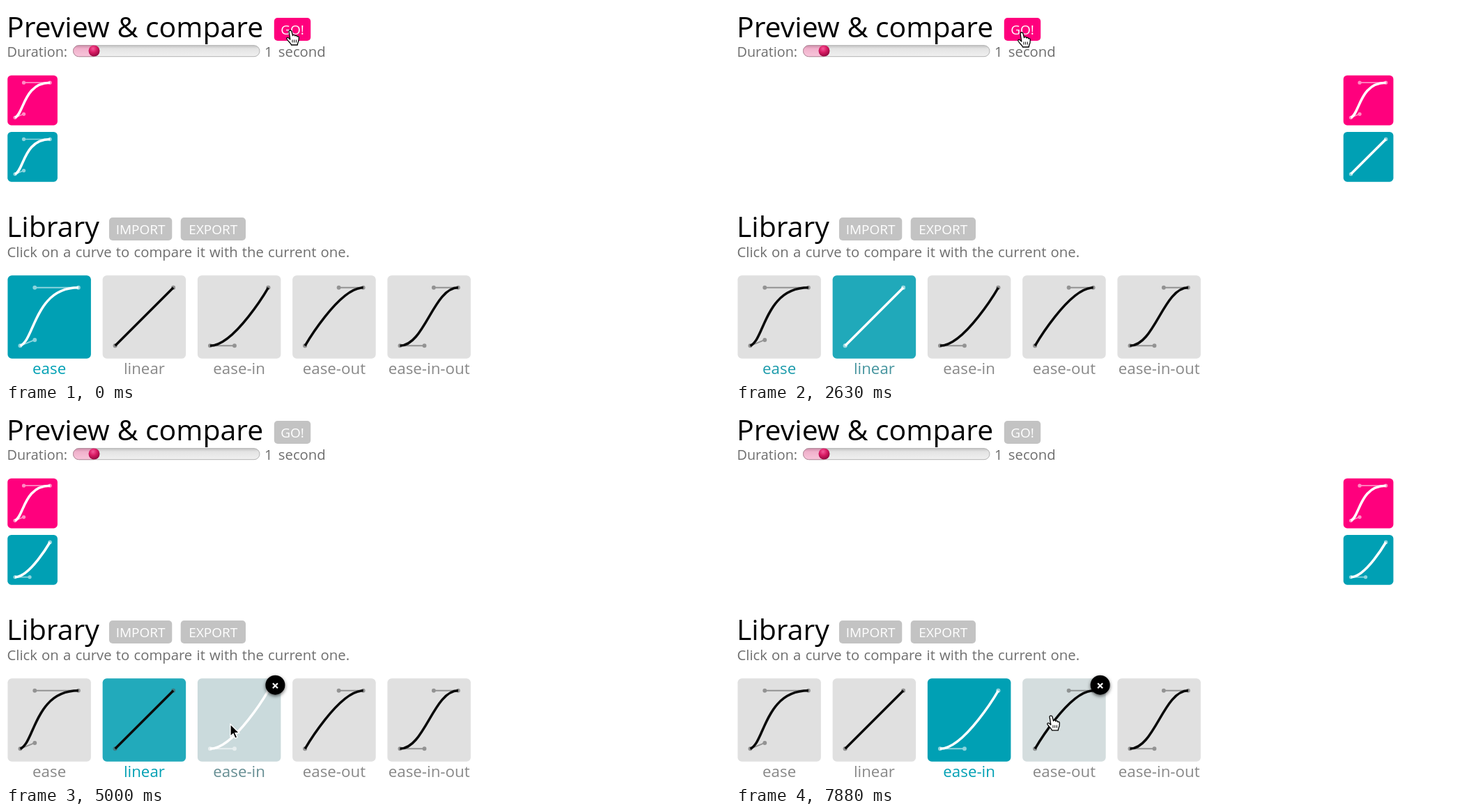
Recreate the animation shown at these times as an HTML page. Size 1039x539 px, loop 8000 ms.

```html
<!DOCTYPE html>
<html lang="en">
<head>
<meta charset="utf-8">
<title>Easing preview</title>
<style>
  html, body { margin: 0; width: 100%; height: 100%; overflow: hidden; background: #fff; }
  svg { display: block; width: 1039px; height: 539px; font-family: 'Open Sans', 'Noto Sans', sans-serif; }
  .heading { font-size: 41px; }
  .note { font-size: 20.3px; word-spacing: 1px; fill: #6e6e6e; }
  .label { font-size: 22.3px; text-anchor: middle; }
  .button { font-size: 19px; font-weight: 500; text-anchor: middle; fill: #fff; }
</style>
</head>
<body>
<svg id="stage" viewBox="0 0 1039 539">
  <defs>
    <linearGradient id="track" x2="0" y2="1">
      <stop offset="0" stop-color="#c4c4c4"/><stop offset=".3" stop-color="#e4e4e4"/><stop offset="1" stop-color="#f0f0f0"/>
    </linearGradient>
    <linearGradient id="filled" x2="0" y2="1">
      <stop offset="0" stop-color="#cf8fab"/><stop offset=".3" stop-color="#f0b2cc"/><stop offset="1" stop-color="#f8c4da"/>
    </linearGradient>
    <radialGradient id="knob" cx=".4" cy=".3" r=".75">
      <stop offset="0" stop-color="#f45a9b"/><stop offset=".45" stop-color="#d91c64"/><stop offset="1" stop-color="#8c063c"/>
    </radialGradient>
    <filter id="shadow" x="-50%" y="-50%" width="200%" height="200%">
      <feDropShadow dx="0" dy="2" stdDeviation="2.5" flood-opacity=".6"/>
    </filter>
  </defs>
  <text class="heading" x="1" y="44.500">Preview &amp; compare</text>
  <text class="note" x="1.500" y="73" style="font-size:19.8px">Duration:</text>
  <rect x="96.500" y="56.700" width="267.500" height="16" rx="8" fill="url(#track)" stroke="#b2b2b2"/>
  <path d="M126 56.700H104.500a8 8 0 0 0 0 16H126Z" fill="url(#filled)" stroke="#b5899b"/>
  <circle cx="126.500" cy="64.500" r="8" fill="url(#knob)"/>
  <text class="note" x="371" y="73" style="word-spacing:3px">1 second</text>
  <text class="heading" x="1" y="332">Library</text>
  <text class="note" x="1.500" y="361">Click on a curve to compare it with the current one.</text>
</svg>
<script>
const LOOP = 8000, STEP = 125;
const PINK = [255, 0, 125], TEAL = [0, 160, 180], GREY = [224, 224, 224];
const BUTTON_GREY = [195, 195, 195], LABEL_GREY = [136, 136, 136];
const LEFT = 2.2, TRAVEL = 869.5;
const rgb = color => `rgb(${color})`;

const CURVES = {
  'ease': [.25, .1, .25, 1],
  'linear': [0, 0, 1, 1],
  'ease-in': [.42, 0, 1, 1],
  'ease-out': [0, 0, .58, 1],
  'ease-in-out': [.42, 0, .58, 1]
};
const names = Object.keys(CURVES);

// Tracks are [time, value, ...] keys.
const goTrack = [[600, 1], [800, 0], [2300, 0], [2500, 1], [4100, 1], [4350, 0],
  [5500, 0], [5750, 1], [7100, 1], [7300, 0]];
const fillTracks = {
  'ease': [[1750, 1], [2250, 0]],
  'linear': [[1550, 0], [1700, .1], [2800, 1], [4940, 1], [5340, 0]],
  'ease-in': [[4940, 0], [5540, 1]],
  'ease-out': [[7650, 0], [7880, .055]]
};
const labelTracks = {
  'ease': [[2500, 1], [3100, 0]],
  'linear': [[2400, 0], [2630, .5], [3200, 1], [5750, 1], [6400, 0]],
  'ease-in': [[4850, 0], [5000, .25], [5880, .4], [6500, 1]]
};
const pointerTrack = [[0, 408, 35], [600, 405, 36], [880, 378, 36], [1400, 240, 400], [1500, 236, 417],
  [1850, 232, 425], [2400, 408, 44], [2630, 410, 38], [2950, 411, 37], [3250, 415, 3],
  [3500, 411, 37], [4000, 411, 38], [4380, 442, 36], [4875, 335, 430], [5000, 322, 453],
  [5150, 330, 440], [5320, 485, 250], [5630, 428, 40], [5880, 424, 34], [7050, 420, 34],
  [7250, 441, 62], [7750, 458, 425], [7880, 452, 441]];
const runs = [{ start: 22, right: true }, { start: 2942, right: false }, { start: 6110, right: true }];

const stage = document.getElementById('stage');

function add(parent, tag, attributes = {}, text = '') {
  const node = document.createElementNS(stage.namespaceURI, tag);
  set(node, attributes);
  node.textContent = text;
  return parent.appendChild(node);
}

function set(node, attributes) {
  for (const key in attributes) node.setAttribute(key, attributes[key]);
}

const mix = (a, b, k) => a + (b - a) * k;
const blend = (a, b, k) => rgb(a.map((v, i) => Math.round(mix(v, b[i], k))));

function sample(track, time, smooth = false) {
  const next = track.findIndex(key => key[0] > time);
  if (next === 0) return track[0].slice(1);
  if (next < 0) return track[track.length - 1].slice(1);
  const [from, to] = [track[next - 1], track[next]];
  let k = (time - from[0]) / (to[0] - from[0]);
  if (smooth) k = k * k * (3 - 2 * k);
  return from.slice(1).map((v, i) => mix(v, to[i + 1], k));
}

function bezier([x1, y1, x2, y2], x) {
  if (x <= 0 || x >= 1) return x <= 0 ? 0 : 1;
  const at = (a, b, s) => 3 * a * s * (1 - s) ** 2 + 3 * b * s * s * (1 - s) + s ** 3;
  let low = 0, high = 1;
  for (let i = 0; i < 24; i++) {
    const middle = (low + high) / 2;
    if (at(x1, x2, middle) < x) low = middle; else high = middle;
  }
  return at(y1, y2, low);
}

function makeTile(scale) {
  const small = scale < 1;
  const group = add(stage, 'g');
  const box = add(group, 'rect', { width: 119.5, height: 119.5, rx: small ? 9 : 6 });
  const handles = add(group, 'g', { 'stroke-width': small ? 2.8 : 1.9 });
  const line = add(group, 'path', { fill: 'none', 'stroke-width': small ? 6 : 3.5 });
  return { group, box, handles, line, scale, dot: small ? 3 : 2 };
}

function drawTile(tile, x, y, name, fill, selected) {
  set(tile.group, { transform: `translate(${x} ${y}) scale(${tile.scale})` });
  set(tile.box, { fill });
  const key = name + selected;
  if (tile.key === key) return;
  tile.key = key;
  const px = v => 18 + 83.5 * v, py = v => 101 - 83.5 * v;
  const [x1, y1, x2, y2] = CURVES[name];
  set(tile.line, {
    d: `M18 101C${px(x1)} ${py(y1)} ${px(x2)} ${py(y2)} 101.5 17.5`,
    stroke: selected ? '#fff' : '#0a0a0a'
  });
  const color = selected ? '#fff' : '#555';
  set(tile.handles, { stroke: color, fill: color, opacity: .55 });
  tile.handles.replaceChildren();
  for (const [cx, cy, ex, ey] of [[x1, y1, 0, 0], [x2, y2, 1, 1]]) {
    add(tile.handles, 'path', { d: `M${px(ex)} ${py(ey)}L${px(cx)} ${py(cy)}` });
    for (const [u, v] of [[cx, cy], [ex, ey]])
      add(tile.handles, 'circle', { cx: px(u), cy: py(v), r: tile.dot });
  }
}

function makeButton(x, y, width, text) {
  const box = add(stage, 'rect', { x, y, width, height: 33, rx: 5, fill: rgb(BUTTON_GREY) });
  add(stage, 'text', { class: 'button', x: x + width / 2, y: y + 24 }, text);
  return box;
}

const goButton = makeButton(384.8, 17, 52.4, 'GO!');
makeButton(148, 304, 90.3, 'IMPORT');
makeButton(250.7, 304, 93.3, 'EXPORT');

const current = makeTile(.6), compared = makeTile(.6);
const library = names.map((name, i) => {
  const x = 2.4 + 136.25 * i;
  const tile = makeTile(1);
  const label = add(stage, 'text', { class: 'label', x: x + 59.75, y: 529 }, name);
  return { name, x, tile, label };
});

const closeButton = add(stage, 'g');
add(closeButton, 'circle', { r: 14, filter: 'url(#shadow)' });
add(closeButton, 'path', { d: 'M-3.5-2.500l7 7m0-7l-7 7', stroke: '#fff', 'stroke-width': 2.2 });

const hand = add(stage, 'g', { fill: '#fff', stroke: '#000', 'stroke-width': 1.3, 'stroke-linejoin': 'round' });
add(hand, 'path', {
  d: 'M-2 1.5C-2-.5 1.5-.5 2 1.5L3.500 7.500C4 5.800 6.500 6 6.800 8C7.500 6.800 9.500 7 9.800 9' +
     'C11 8 12.300 8.800 12.300 10.500L12 14.500C11.500 17 10.500 17.500 10.300 21H1.500' +
     'C1 18.500-2.500 16.500-5 12.500C-6 10.800-4 9.800-2.600 10.800L-.2 13Z'
});
add(hand, 'path', { d: 'M3 13.500v4M5.700 13.500v4M8.400 13.500v4', 'stroke-width': 1 });
const arrow = add(stage, 'path', {
  d: 'M0 0V17.500L4 13.800L6.800 20.300L9.800 19L7 12.600H12.500Z', stroke: '#fff', 'stroke-width': 1.3
});

function draw(time) {
  const selected = time < 1700 ? 'ease' : time < 4940 ? 'linear' : 'ease-in';
  const run = runs.filter(r => r.start <= time).pop() || runs[0];
  const position = name => {
    const k = bezier(CURVES[name], (time - run.start) / 1000);
    return LEFT + TRAVEL * (run.right ? k : 1 - k);
  };
  drawTile(current, position('ease'), 99.7, 'ease', rgb(PINK), true);
  drawTile(compared, position(selected), 181, selected, rgb(TEAL), true);
  set(goButton, { fill: blend(BUTTON_GREY, PINK, sample(goTrack, time)[0]) });

  const [x, y] = sample(pointerTrack, time, true);
  let hovered = null;
  for (const item of library) {
    const level = tracks => tracks[item.name] ? sample(tracks[item.name], time)[0] : 0;
    drawTile(item.tile, item.x, 387.3, item.name, blend(GREY, TEAL, level(fillTracks)), item.name === selected);
    set(item.label, { fill: blend(LABEL_GREY, TEAL, level(labelTracks)) });
    if (y > 387 && x > item.x && x < item.x + 119.5) hovered = item;
  }
  set(closeButton, {
    visibility: hovered ? 'visible' : 'hidden',
    transform: `translate(${hovered ? hovered.x + 111.5 : 0} 396.700)`
  });

  const pointing = time < 3000 || time > 5200;
  const transform = `translate(${x} ${y})`;
  set(hand, { transform, visibility: pointing ? 'visible' : 'hidden' });
  set(arrow, { transform, visibility: pointing ? 'hidden' : 'visible' });
}

const begin = performance.now();
function tick() {
  const elapsed = (performance.now() - begin) % LOOP;
  draw(Math.floor(elapsed / STEP) * STEP);
  requestAnimationFrame(tick);
}
tick();
</script>
</body>
</html>
```
